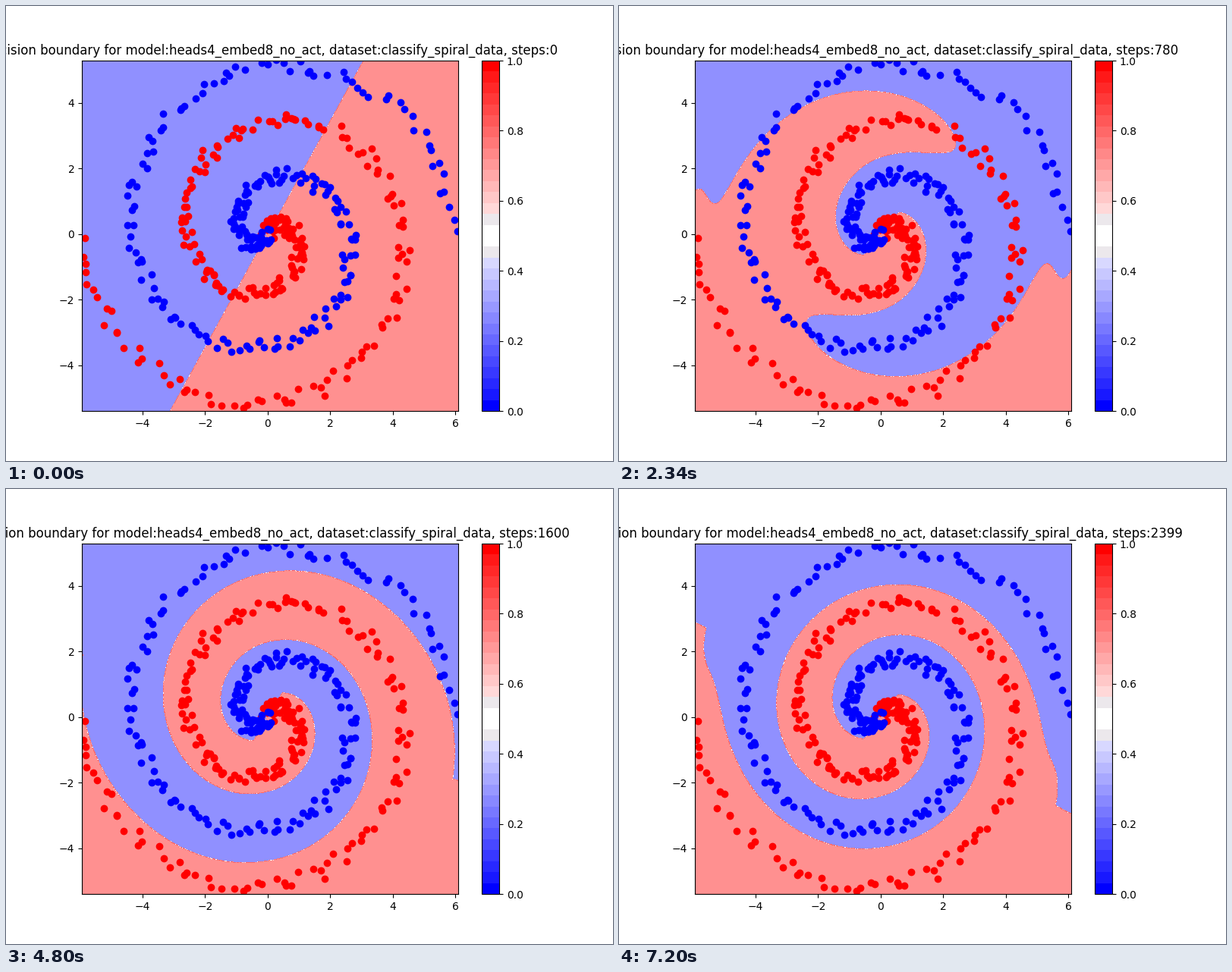
Write a matplotlib script that moves like this. It is 800 px wide and 600 px high and loops after 7.26 s.

```python
import numpy as np
import matplotlib.pyplot as plt
from matplotlib.animation import FuncAnimation
from matplotlib.cm import ScalarMappable
from matplotlib.colors import ListedColormap

FRAMES, INTERVAL = 121, 60
WIDTH, HEIGHT = 496, 462                 # plot area in pixels
XLIM, YLIM = (-5.943, 6.096), (-5.393, 5.289)
BLUE, RED = (144, 144, 255), (255, 144, 144)

rng = np.random.default_rng(7)


def centers(lo, hi, n):
    return lo + (np.arange(n) + 0.5) / n * (hi - lo)


X, Y = np.meshgrid(centers(*XLIM, WIDTH), centers(*YLIM[::-1], HEIGHT))
R, T = np.hypot(X, Y), np.arctan2(X, Y)  # T runs clockwise from the top


def winding(knots):
    """Boundary angle at every radius, from its values at radii 1 to 6."""
    p = np.array(knots, float)
    m = np.gradient(p)
    s = np.clip(R, 0.85, 6.2) - 1
    i = np.clip(s.astype(int), 0, 4)
    u = s - i
    v = 1 - u
    return (p[i] * (1 + 2 * u) * v ** 2 + m[i] * u * v ** 2
            + p[i + 1] * (3 - 2 * u) * u ** 2 - m[i + 1] * v * u ** 2)


def spiral_field(*knots):
    """Two-armed field, positive in the red class."""
    return np.sin(T - winding(knots))


def lobed_field(*knots):
    """The same with a wedge of flipped class on both sides of a red core."""
    wedge = 0.75 + 0.25 * (R / 4) ** 4 - np.cos(2 * (T - 1.02))
    return spiral_field(*knots) * np.minimum(wedge, 2) + 1.5 * np.exp(-R ** 2)


poses = {
    0: spiral_field(*[0.523] * 6),
    21: lobed_field(3.34, 3.34, 3.45, 2.15, 1.62, 1.65),
    39: spiral_field(0.95, 2.7, 3.75, 3.65, 1.9, 1.8),
    52: spiral_field(0.85, 3.0, 4.6, 5.85, 6.95, 7.6),
    69: spiral_field(0.75, 2.75, 4.4, 5.8, 7.1, 7.95),
    92: spiral_field(0.9, 2.55, 4.25, 5.65, 7.05, 8.0),
    120: spiral_field(0.9, 2.5, 4.1, 6.3, 7.8, 8.2),
}
times = list(poses)

specks = np.array([(255, 104, 104), (255, 255, 255), RED], np.uint8)
speckle = specks[rng.choice(3, (HEIGHT, WIDTH), p=[0.6, 0.14, 0.26])]


def region(i):
    k = min(np.searchsorted(times, i, side="right"), len(times) - 1)
    a, b = times[k - 1], times[k]
    u = (i - a) / (b - a)
    red = (1 - u) * poses[a] + u * poses[b] > 0
    img = np.where(red[..., None], RED, BLUE).astype(np.uint8)
    edge = np.zeros_like(red)
    edge[:-1] |= red[:-1] != red[1:]
    edge[:, :-1] |= red[:, :-1] != red[:, 1:]
    img[edge] = speckle[edge]
    return img


def spiral_points(phase, n=220, noise=0.23):
    s = np.arange(n) / n
    r, t = 6 * s, 3.5 * np.pi * s + phase
    jitter = rng.uniform(-noise, noise, (2, n))
    return r * np.sin(t) + jitter[0], r * np.cos(t) + jitter[1]


def band_colors():
    """Blue to white to red in 32 steps, grey next to the white."""
    ramp = (16 * np.arange(16) + 8) / 255
    ramp[0], ramp[-1] = 0, 1
    one = np.ones(16)
    low = np.column_stack([ramp, ramp, one])
    high = np.column_stack([one, ramp, ramp])
    low[14] = high[14] = (0.925, 0.91, 0.925)
    return np.vstack([low, high[::-1]])


fig, ax = plt.subplots(figsize=(8, 6), dpi=100)
image = ax.imshow(region(0), extent=(*XLIM, *YLIM), aspect="auto",
                  interpolation="nearest")
ax.scatter(*spiral_points(0), color="red")
ax.scatter(*spiral_points(np.pi), color="blue")
ax.set_xlim(XLIM)
ax.set_ylim(YLIM)
fig.colorbar(ScalarMappable(cmap=ListedColormap(band_colors())), ax=ax)
title = ax.set_title("")


def update(i):
    image.set_data(region(i))
    title.set_text("Decision boundary for model:heads4_embed8_no_act, "
                   f"dataset:classify_spiral_data, steps:{min(20 * i, 2399)}")
    return image, title


anim = FuncAnimation(fig, update, frames=FRAMES, interval=INTERVAL,
                     repeat=True, repeat_delay=0)
plt.show()
```
